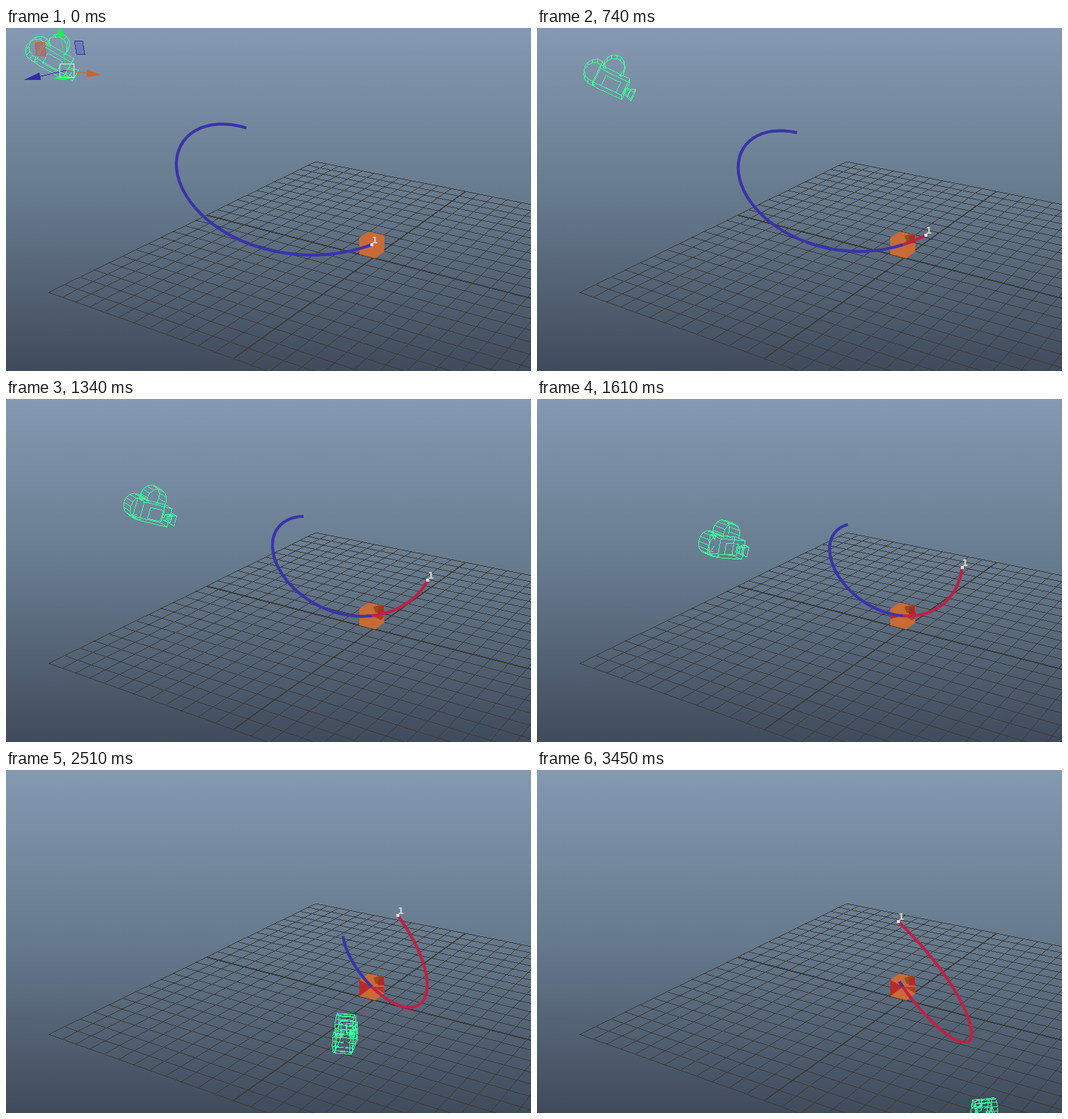
An HTML page with a canvas that plays this animation: 706 by 462 pixels, repeating every 4.09 s.

```html
<!DOCTYPE html>
<html lang="en">
<head>
<meta charset="utf-8">
<title>Camera motion trail</title>
<style>
  html, body { margin: 0; width: 100%; height: 100%; overflow: hidden; background: #66798d; }
  canvas { display: block; }
</style>
</head>
<body>
<canvas id="stage" width="706" height="462"></canvas>
<script>
const W = 706, H = 462, LOOP = 4090;
const HOLD = 200, STEP = 67.7, LAST_STEP = 49, FULL_MOVE = 54.5;
const BLUE = '#3a33aa', RED = '#be2146', GREEN = '#3dffa0', GRID = '#3c3a38';

const stage = document.getElementById('stage').getContext('2d');
const backdrop = document.createElement('canvas');
backdrop.width = W;
backdrop.height = H;
let ctx = stage;

// World space: a and b lie on the ground, c points up, the grid spans -1 to 1.
const CUBE = [0.005, -0.002, 0.064];
const START = { pos: [0.914, -0.797, 0.909], yaw: -48.8, pitch: -35 };
const END = { pos: [-0.61, -0.36, -0.225], yaw: 46.2, pitch: 12.5 };

function project([a, b, c]) {
  const w = 1 + 0.1259 * a + 0.2081 * b - 0.1128 * c;
  return [
    (493.5 - 189.2 * a + 251.9 * b - 55.3 * c) / w,
    (309.1 - 25.6 * a - 43.3 * b - 298.9 * c) / w
  ];
}

const mix = (p, q, u) => p + (q - p) * u;
const dot = (p, q) => p[0] * q[0] + p[1] * q[1] + p[2] * q[2];
const range = (n, f) => Array.from({ length: n }, (_, i) => f(i));

// Position and side, up and forward axes of the moving camera.
function poseAt(s) {
  const rad = Math.PI / 180;
  const yaw = (mix(START.yaw, END.yaw, s) + 3 * Math.sin(Math.PI * s)) * rad;
  const pitch = mix(START.pitch, END.pitch, s) * rad;
  const sy = Math.sin(yaw), cy = Math.cos(yaw);
  const sp = Math.sin(pitch), cp = Math.cos(pitch);
  return {
    pos: START.pos.map((v, i) => mix(v, END.pos[i], s)),
    axes: [[cy, -sy, 0], [-sp * sy, -sp * cy, cp], [cp * sy, cp * cy, sp]]
  };
}

const toWorld = ({ pos, axes }, v) =>
  pos.map((p, i) => p + axes[0][i] * v[0] + axes[1][i] * v[1] + axes[2][i] * v[2]);

// The cube as the camera sees it at time s.
function seenAt(s) {
  const { pos, axes } = poseAt(s);
  const d = CUBE.map((v, i) => v - pos[i]);
  return axes.map(axis => dot(axis, d));
}

function trace(points, close) {
  ctx.beginPath();
  points.forEach(p => ctx.lineTo(...p));
  if (close) ctx.closePath();
}
function fill(points, color) {
  trace(points, true);
  ctx.fillStyle = color;
  ctx.fill();
}
function stroke(points, color, width, close) {
  trace(points, close);
  ctx.strokeStyle = color;
  ctx.lineWidth = width;
  ctx.stroke();
}

// Hard-edged line, one pixel per step along its longer side.
function pixelLine([x0, y0], [x1, y1], color, thick = 1) {
  const dx = x1 - x0, dy = y1 - y0;
  const steep = Math.abs(dy) > Math.abs(dx);
  const n = Math.max(1, Math.round(Math.max(Math.abs(dx), Math.abs(dy))));
  ctx.fillStyle = color;
  for (let i = 0; i <= n; i++) {
    const x = Math.floor(x0 + dx * i / n), y = Math.floor(y0 + dy * i / n);
    if (x < 0 || y < 0 || x >= W || y >= H) continue;
    ctx.fillRect(x, y, steep ? thick : 1, steep ? 1 : thick);
  }
}
function wire(points, color) {
  points.forEach((p, i) => pixelLine(p, points[(i + 1) % points.length], color));
}

function drawGround() {
  const sky = ctx.createLinearGradient(0, 0, 0, H);
  sky.addColorStop(0, '#8499b2');
  sky.addColorStop(0.5, '#667a8d');
  sky.addColorStop(1, '#404b5c');
  ctx.fillStyle = sky;
  ctx.fillRect(0, 0, W, H);
  for (let i = -12; i <= 12; i++) {
    const v = i / 12, thick = i ? 1 : 2;
    pixelLine(project([v, -1, 0]), project([v, 1, 0]), GRID, thick);
    pixelLine(project([-1, v, 0]), project([1, v, 0]), GRID, thick);
  }
}

function drawCube(step) {
  const r = 1 / 24;
  const corner = (a, b, c) => project([CUBE[0] + a * r, CUBE[1] + b * r, CUBE[2] + c * r]);
  const outline = [corner(1, 1, 1), corner(-1, 1, 1), corner(-1, 1, -1),
    corner(-1, -1, -1), corner(1, -1, -1), corner(1, -1, 1)];
  fill(outline, '#c96b37');
  if (!step) return;

  const [x, y] = project(CUBE);
  const [, right, rightLow, , leftLow, left] = outline;
  fill([[x + 2, y - 12], [x + 11, y - 15], right, [x + 12, y - 4], [x + 5, y - 4]], '#93501f');
  fill([[x + 9, y - 12], [x + 16, y - 14], [x + 17, y - 2], [x + 8, y - 2]], '#ae2a28');
  const grow = Math.max(0, Math.min(1, (step - 16) / 18));
  if (!grow) return;
  const toward = (p, q) => [mix(p[0], q[0], grow), mix(p[1], q[1], grow)];
  const leftMid = [left[0], y], rightMid = [right[0], y];
  fill([toward(leftMid, left), [x, y], toward(leftMid, leftLow)], '#b92b2b');
  fill([[x + 2, y], rightMid, toward(rightMid, rightLow), [x + 12, y + 6]], '#b3392b');
}

// The cube's path in camera space, carried along by the camera.
function drawTrail(pose, from, to, color) {
  const points = range(41, i => project(toWorld(pose, seenAt(mix(from, to, i / 40)))));
  stroke(points, color, 4);
}

function drawIcon(pose) {
  const at = (f, u, s) =>
    project(toWorld(pose, [s * 0.034, (u + 0.25) * 0.037, (f - 1) * 0.058]));
  const prism = (near, far) => {
    wire(near, GREEN);
    wire(far, GREEN);
    near.forEach((p, i) => pixelLine(p, far[i], GREEN));
  };
  const side = (f, u, s) => [at(-f, -u, s), at(f, -u, s), at(f, u, s), at(-f, u, s)];
  const reel = (f, u, s) => range(14, i => {
    const q = i / 7 * Math.PI;
    return at(f + 0.66 * Math.cos(q), u + 1.2 * Math.sin(q), s);
  });
  const lens = (f, r) => [at(f, -0.25 - r, -r), at(f, -0.25 + r, -r),
    at(f, -0.25 + r, r), at(f, -0.25 - r, r)];

  // The body covers the lower part of both reels.
  ctx.save();
  trace(side(1, 1, 0), true);
  ctx.rect(0, 0, W, H);
  ctx.clip('evenodd');
  for (const [f, u] of [[-1.17, 0.22], [-0.22, 1.5]]) prism(reel(f, u, -1), reel(f, u, 1));
  ctx.restore();
  prism(side(1, 1, -1), side(1, 1, 1));
  wire(side(0.5, 0.6, -1), GREEN);
  prism(lens(1, 0.3), lens(1.3, 0.4));
  prism(lens(1.3, 0.4), lens(1.6, 0.55));
}

function drawGizmo() {
  const pivot = [81, 57];
  const arrow = (tip, base, half, shaft, head) => {
    const dx = tip[0] - base[0], dy = tip[1] - base[1], k = half / Math.hypot(dx, dy);
    pixelLine(pivot, base, shaft);
    fill([tip, [base[0] - dy * k, base[1] + dx * k],
      [base[0] + dy * k, base[1] - dx * k]], head);
  };
  const plane = (points, inside, edge) => {
    fill(points, inside);
    wire(points, edge);
  };
  arrow([72, -2], [74, 12], 6, '#2be85c', '#20ee50');
  arrow([24, 70], [46, 65], 5, '#2d2c9c', '#302ea8');
  arrow([128, 63], [109, 61], 5, '#c5653a', '#cb622e');
  plane([[39, 19], [52, 19], [54, 37], [41, 38]], 'rgba(190,90,80,.6)', '#b96958');
  plane([[92, 17], [103, 18], [106, 35], [95, 35]], 'rgba(80,90,190,.4)', '#3433a2');
  fill([[63, 68], [76, 64], [91, 67], [78, 70]], '#30ee70');
  wire([[72, 48], [91, 48], [91, 66], [72, 66]], '#c5f5e0');
}

function drawMarker([x, y]) {
  ctx.fillStyle = '#e4e4e0';
  ctx.fillRect(Math.round(x) - 2, Math.round(y) - 2, 4, 4);
  ctx.fillStyle = '#d2d2d0';
  ctx.font = 'bold 12px "DejaVu Sans", sans-serif';
  ctx.textAlign = 'center';
  ctx.fillText('1', x + 4, y - 2);
}

function stepAt(t) {
  if (t < HOLD) return 0;
  return Math.min(LAST_STEP, Math.floor((t - HOLD) / STEP + 1.25));
}

function draw(t) {
  const step = stepAt(t);
  const s = (1 - Math.cos(Math.PI * step / FULL_MOVE)) / 2;
  const pose = poseAt(s);
  ctx.drawImage(backdrop, 0, 0);
  drawCube(step);
  if (step) drawTrail(pose, s, 0, RED);
  drawTrail(pose, s, 1, BLUE);
  drawIcon(pose);
  if (!step) drawGizmo();
  drawMarker(project(toWorld(pose, seenAt(0))));
}

ctx = backdrop.getContext('2d');
drawGround();
ctx = stage;

const begin = performance.now();
function tick() {
  draw((performance.now() - begin) % LOOP);
  requestAnimationFrame(tick);
}
tick();
</script>
</body>
</html>
```
